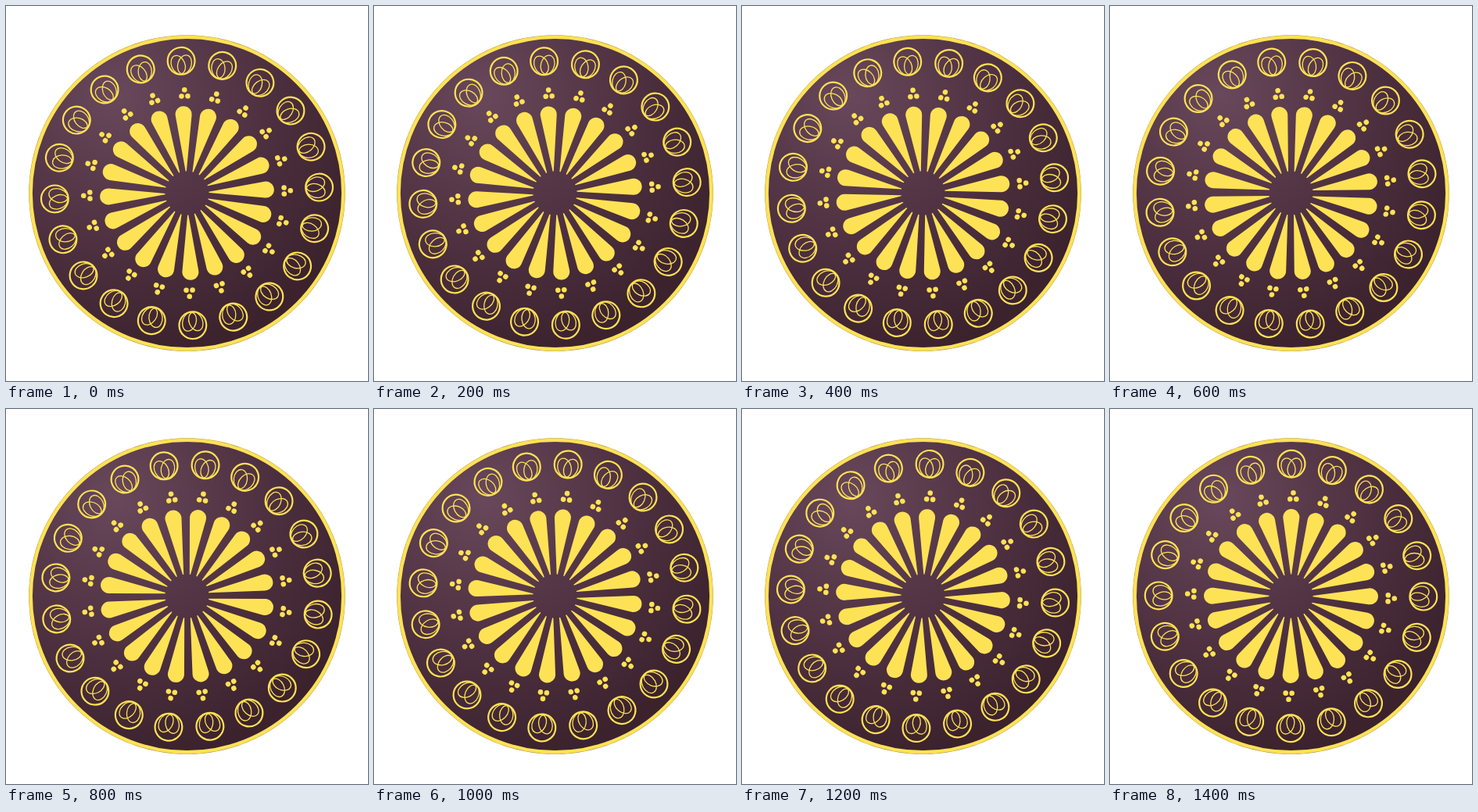
Write an HTML page that moves like this. It is 463 by 480 pixels and loops after 1600 ms.

```html
<!DOCTYPE html>
<html lang="en">
<head>
<meta charset="utf-8">
<title>Turning disc</title>
<style>
html, body { margin: 0; width: 100%; height: 100%; overflow: hidden; background: #fff; }
svg { display: block; width: 100%; height: 100%; }
</style>
</head>
<body>
<svg viewBox="0 0 463 480">
  <defs>
    <radialGradient id="plum" gradientUnits="userSpaceOnUse" cx="-92" cy="-125" r="340">
      <stop offset="0" stop-color="#68485a"/>
      <stop offset=".4" stop-color="#563748"/>
      <stop offset=".72" stop-color="#472b39"/>
      <stop offset="1" stop-color="#3b222d"/>
    </radialGradient>
    <path id="petal" d="M-.6-28 L-10.4-99.5 A10.5 10.5 0 1 1 10.4-99.5 L.6-28Z"/>
    <g id="dots" transform="rotate(1.1)">
      <circle cy="-132.3" r="3.3"/>
      <circle cx="-4" cy="-124.2" r="3.3"/>
      <circle cx="4" cy="-124.2" r="3.3"/>
    </g>
    <g id="seal" transform="translate(0 -169.3)" fill="none" stroke="#fee255">
      <circle r="17.4" stroke-width="2.2"/>
      <ellipse cy="4" rx="8.6" ry="12.3" stroke-width="1.3" transform="rotate(-20 0 16)"/>
      <ellipse cy="4" rx="8.6" ry="12.3" stroke-width="1.3" transform="rotate(20 0 16)"/>
    </g>
  </defs>
  <g transform="translate(231.5 239.5)">
    <circle r="202.3" fill="#a8903f"/>
    <circle r="199.8" fill="url(#plum)" stroke="#fee255" stroke-width="4.4"/>
    <g id="wheel" fill="#fee255"></g>
  </g>
</svg>
<script>
const COUNT = 20, LOOP = 1600, STEP = 200;
// The turn is held for each step and slows slightly in the first half.
const angles = [-2.5, -4.7, -6.7, -8.4, -10, -12.35, -15.1, -17.8];
const wheel = document.getElementById('wheel');

wheel.innerHTML = Array.from({ length: COUNT }, (_, i) =>
  `<g transform="rotate(${i * 360 / COUNT})">` +
  ['petal', 'dots', 'seal'].map(id => `<use href="#${id}"/>`).join('') + '</g>'
).join('');

const start = performance.now();
function draw(now) {
  const t = Math.max(0, now - start) % LOOP;
  wheel.setAttribute('transform', `rotate(${angles[Math.floor(t / STEP)]})`);
  requestAnimationFrame(draw);
}
draw(start);
</script>
</body>
</html>
```
